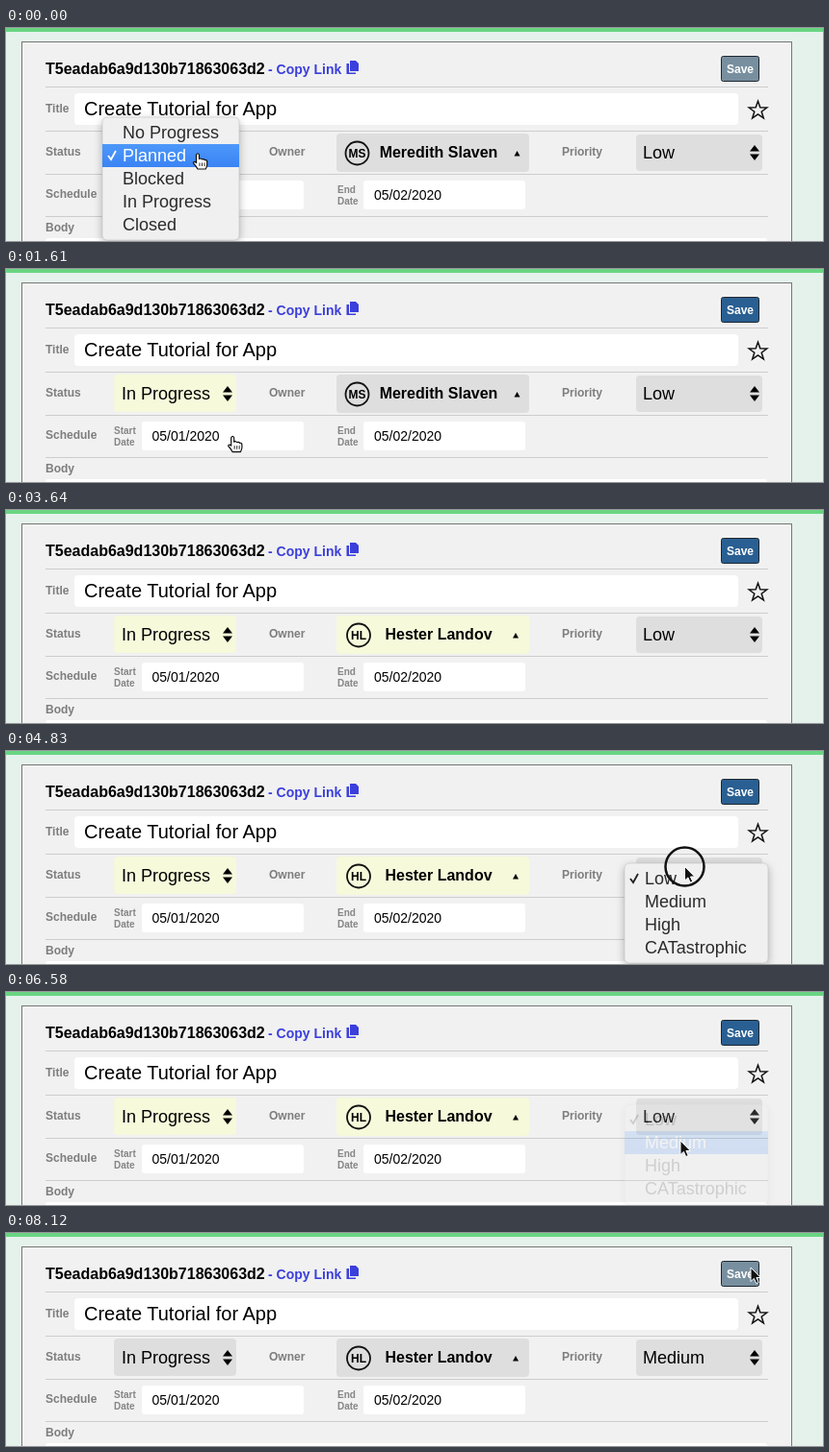
These frames come from a looping animation (848 by 222 pixels, 8260 ms). An HTML page:

```html
<!DOCTYPE html>
<html lang="en">
<head>
<meta charset="utf-8">
<title>Task editor</title>
<style>
  html, body { margin: 0; width: 100%; height: 100%; overflow: hidden; background: #e5f2eb; }
  svg { display: block; width: 848px; height: 222px; font-family: "Liberation Sans", Arial, sans-serif; }
  text { white-space: pre; }
  .b { font-weight: bold; }
  .label { font: bold 12px "Liberation Sans", Arial, sans-serif; fill: #7d7d7d; }
  .small { font: bold 10px "Liberation Sans", Arial, sans-serif; fill: #858585; }
  .value { font-size: 18px; }
  .date { font-size: 14px; }
  .line { stroke: #cdcdcd; }
  .mid { text-anchor: middle; }
  .menu { filter: drop-shadow(0 3px 4px rgba(0, 0, 0, .28)); }
  .menu text { font-size: 18px; fill: #2b2b2b; }
  .menu .on text { fill: #fff; }
  .menu .on .check { stroke: #fff; }
  .menu .bar { fill: none; }
  .menu .on .bar { fill: url(#blue); }
  .check { fill: none; stroke: #222; stroke-width: 1.8; }
  .search { filter: drop-shadow(0 2px 3px rgba(0, 0, 0, .5)); }
</style>
</head>
<body>
<svg viewBox="0 0 848 222">
  <defs>
    <linearGradient id="blue" x2="0" y2="1">
      <stop stop-color="#4d98fa"/><stop offset="1" stop-color="#3a83f4"/>
    </linearGradient>
    <g id="updown"><path d="M-5 -1.5L0 -8L5 -1.5ZM-5 1.5L0 8L5 1.5Z"/></g>
  </defs>

  <rect width="848" height="222" fill="#e5f2eb"/>
  <rect width="848" height="4" fill="#69d583"/>
  <rect x="16.5" y="14.5" width="799" height="230" fill="#f1f1f1" stroke="#777"/>
  <path class="line" d="M41 61.5H791M41 107.5H791M41 152.5H791M41 196.5H791"/>

  <text class="b" x="41" y="48" font-size="16">T5eadab6a9d130b71863063d2</text>
  <text class="b" x="272" y="48" font-size="14" fill="#3b3fdc">- Copy Link</text>
  <g fill="#3b3fdc">
    <path d="M357 34h6l3 3v8h-9z"/>
    <path d="M353.5 37h2.5v9.500h7v1.500h-9.500z"/>
  </g>
  <rect id="save" x="742.5" y="29.500" width="39" height="26" rx="2" stroke="#1d2730"/>
  <text class="b mid" x="762" y="47" font-size="12" fill="#fff">Save</text>

  <text class="label" x="41" y="88">Title</text>
  <rect x="71" y="68" width="689" height="33" rx="4" fill="#fff"/>
  <text x="81" y="91" font-size="20">Create Tutorial for App</text>
  <path id="star" fill="none" stroke="#111" stroke-width="1.5"/>

  <text class="label" x="41" y="133">Status</text>
  <rect id="statusBox" x="112" y="110" width="127" height="39" rx="4"/>
  <text id="statusText" class="value" x="120" y="136"></text>
  <use href="#updown" x="230" y="130"/>

  <text class="label" x="273" y="133">Owner</text>
  <rect id="ownerBox" x="343" y="110" width="200" height="40" rx="4"/>
  <circle id="badge" cy="130.500" r="12" fill="none" stroke="#111" stroke-width="1.800"/>
  <text id="initials" class="b mid" y="135" font-size="12"></text>
  <text id="owner" class="b mid" x="449" y="135" font-size="16"></text>
  <path id="caret"/>

  <text class="label" x="577" y="133">Priority</text>
  <rect id="priorityBox" x="654" y="111" width="131" height="38" rx="4"/>
  <text id="priorityText" class="value" x="661" y="136"></text>
  <use href="#updown" x="777" y="130"/>

  <text class="label" x="41" y="177">Schedule</text>
  <text class="small" x="112" y="172">Start</text>
  <text class="small" x="112" y="184">Date</text>
  <rect x="141" y="159" width="168" height="30" rx="3" fill="#fff"/>
  <text class="date" x="151.500" y="179">05/01/2020</text>
  <text class="small" x="344" y="172">End</text>
  <text class="small" x="344" y="184">Date</text>
  <rect x="371" y="159" width="168" height="30" rx="3" fill="#fff"/>
  <text class="date" x="382" y="179">05/02/2020</text>

  <text class="label" x="41" y="212">Body</text>
  <rect x="41" y="219" width="749" height="10" rx="3" fill="#fff"/>

  <g id="search" class="search">
    <g id="match">
      <rect x="344" y="188" width="199" height="33" fill="#fff"/>
      <text x="355" y="210" font-size="16">Hester Landov</text>
    </g>
    <rect x="343.500" y="155.500" width="200" height="32" rx="5" fill="#fff" stroke="#666" stroke-width="1.300"/>
    <text id="query" class="value" x="355" y="178"></text>
    <path id="beam" d="M0 161V183" stroke="#111"/>
  </g>

  <g id="statusMenu" class="menu"></g>
  <g id="priorityMenu" class="menu"></g>

  <g id="cursor">
    <circle id="ring" r="20" fill="none" stroke="#111" stroke-width="2.500"/>
    <path id="arrow" d="M0 0V14.500L3.400 11.400L5.700 16.600L8.200 15.500L5.900 10.500H10.300Z" fill="#111" stroke="#fff"/>
    <g id="hand" fill="#fff" stroke="#111" stroke-width="1.200" stroke-linejoin="round">
      <path d="M-1.500 9.500V1Q0 -1.500 1.500 1V5.500Q3.500 4.300 4.500 6Q6.500 5 7.400 6.700Q9.500 6 9.700 8.500V11.500Q9.500 13.500 8.200 16H0Q-1.500 13 -4.500 9.800Q-4 7.200 -1.500 9.500Z"/>
      <path d="M2 9.500V13M4.500 9.500V13M7 9.500V13" stroke-width=".9"/>
    </g>
  </g>
</svg>
<script>
const LOOP = 8260, STEP = 70;
const GREY = '#dedede', YELLOW = '#f6f9da';
const T = {
  statusFade: 1220, statusSet: 1540,
  hover: 1820, ownerOpen: 2030, type: 2660, ownerSet: 3570,
  cursorBack: 4200, priorityOpen: 4760, priorityFade: 6340, prioritySet: 6650,
  saved: 7700
};
const FADE = 290;
const CLICKS = [2030, 4760, 7630];

// time, x, y of the pointer tip
const PATH = [
  [0, 199, 131], [210, 199, 131], [840, 191, 185], [1470, 191, 185],
  [1960, 414, 133], [4200, 414, 133], [4700, 704.5, 120.5], [5040, 704.5, 120.5],
  [5740, 700, 155], [6650, 700, 155], [7490, 773, 36], [LOOP, 773, 36]
];

const el = {};
document.querySelectorAll('[id]').forEach(n => el[n.id] = n);
const set = (n, name, v) => n.setAttribute(name, v);
const show = (n, on) => n.style.display = on ? '' : 'none';
const between = (t, a, b) => t >= a && t < b;

el.star.setAttribute('d', 'M' + Array.from({ length: 10 }, (_, i) => {
  const r = i % 2 ? 3.9 : 9.8, a = i * Math.PI / 5;
  return (780.5 + r * Math.sin(a)).toFixed(1) + ' ' + (86 - r * Math.cos(a)).toFixed(1);
}).join('L') + 'Z');

function buildMenu(node, x, y, w, items, checked) {
  const h = items.length * 24 + 8;
  node.innerHTML = `<rect x="${x}" y="${y}" width="${w}" height="${h}" rx="5" fill="#f0f0f0" stroke="#c4c4c4" stroke-width=".6"/>` +
    items.map((name, i) => {
      const top = y + 4 + i * 24;
      const check = i === checked ? `<path class="check" d="M${x + 6} ${top + 12}l3 4l5 -9"/>` : '';
      return `<g class="row" data-top="${top}"><rect class="bar" x="${x}" y="${top}" width="${w}" height="24"/>` +
        `${check}<text x="${x + 21}" y="${top + 18}">${name}</text></g>`;
    }).join('');
}
buildMenu(el.statusMenu, 100, 93, 142, ['No Progress', 'Planned', 'Blocked', 'In Progress', 'Closed'], 1);
buildMenu(el.priorityMenu, 642, 117, 149, ['Low', 'Medium', 'High', 'CATastrophic'], 0);

function drawMenu(node, t, open, fade, y) {
  show(node, between(t, open, fade + FADE));
  node.style.opacity = Math.min(1, 1 - (t - fade) / FADE);
  for (const row of node.querySelectorAll('.row')) {
    const d = y - row.dataset.top;
    row.classList.toggle('on', d >= 0 && d < 24);
  }
}

function pointer(t) {
  const i = PATH.findIndex(p => p[0] > t);
  const [t0, x0, y0] = PATH[i - 1], [t1, x1, y1] = PATH[i];
  const k = (t - t0) / (t1 - t0), e = k * k * (3 - 2 * k);
  return [x0 + (x1 - x0) * e, y0 + (y1 - y0) * e];
}

function drawFields(t) {
  const edited = at => between(t, at, T.saved) ? YELLOW : GREY;
  const newOwner = t >= T.ownerSet;
  const open = between(t, T.ownerOpen, T.ownerSet);
  const hover = between(t, T.hover, T.ownerSet);

  set(el.save, 'fill', between(t, T.statusSet, T.saved) ? '#295f92' : '#788f9f');
  set(el.statusBox, 'fill', edited(T.statusSet));
  el.statusText.textContent = t < T.statusSet ? 'Planned' : 'In Progress';
  set(el.priorityBox, 'fill', edited(T.prioritySet));
  el.priorityText.textContent = t < T.prioritySet ? 'Low' : 'Medium';

  set(el.ownerBox, 'fill', hover ? '#d0d0d0' : edited(T.ownerSet));
  el.owner.textContent = newOwner ? 'Hester Landov' : 'Meredith Slaven';
  el.initials.textContent = newOwner ? 'HL' : 'MS';
  const bx = newOwner ? 366 : 364.5;
  set(el.badge, 'cx', bx);
  set(el.initials, 'x', bx);
  const cx = newOwner ? 529 : 530.5;
  set(el.caret, 'd', open ? `M${cx - 3} 127h6l-3 5.5z` : `M${cx - 3} 133.500h6l-3 -5.500z`);

  show(el.search, open);
  const typed = t < T.type ? '' : 'Hes'.slice(0, 1 + Math.floor((t - T.type) / 140));
  el.query.textContent = typed || 'Type a name';
  set(el.query, 'fill', typed ? '#111' : '#777');
  show(el.match, typed);
  set(el.beam, 'transform', `translate(${354.5 + [0, 14, 24, 33][typed.length]} 0)`);
}

function draw(t) {
  const [x, y] = pointer(t);
  drawFields(t);
  drawMenu(el.statusMenu, t, 0, T.statusFade, y);
  drawMenu(el.priorityMenu, t, T.priorityOpen, T.priorityFade, y);

  const hand = x < 243 || (x > 343 && x < 543);
  show(el.cursor, !between(t, T.type, T.cursorBack));
  show(el.hand, hand);
  show(el.arrow, !hand);
  show(el.ring, CLICKS.some(c => between(t, c, c + 140)));
  set(el.cursor, 'transform', `translate(${x.toFixed(1)} ${y.toFixed(1)})`);
}

const start = performance.now();
function tick() {
  const t = (performance.now() - start) % LOOP;
  draw(t - t % STEP);
  requestAnimationFrame(tick);
}
tick();
</script>
</body>
</html>
```
